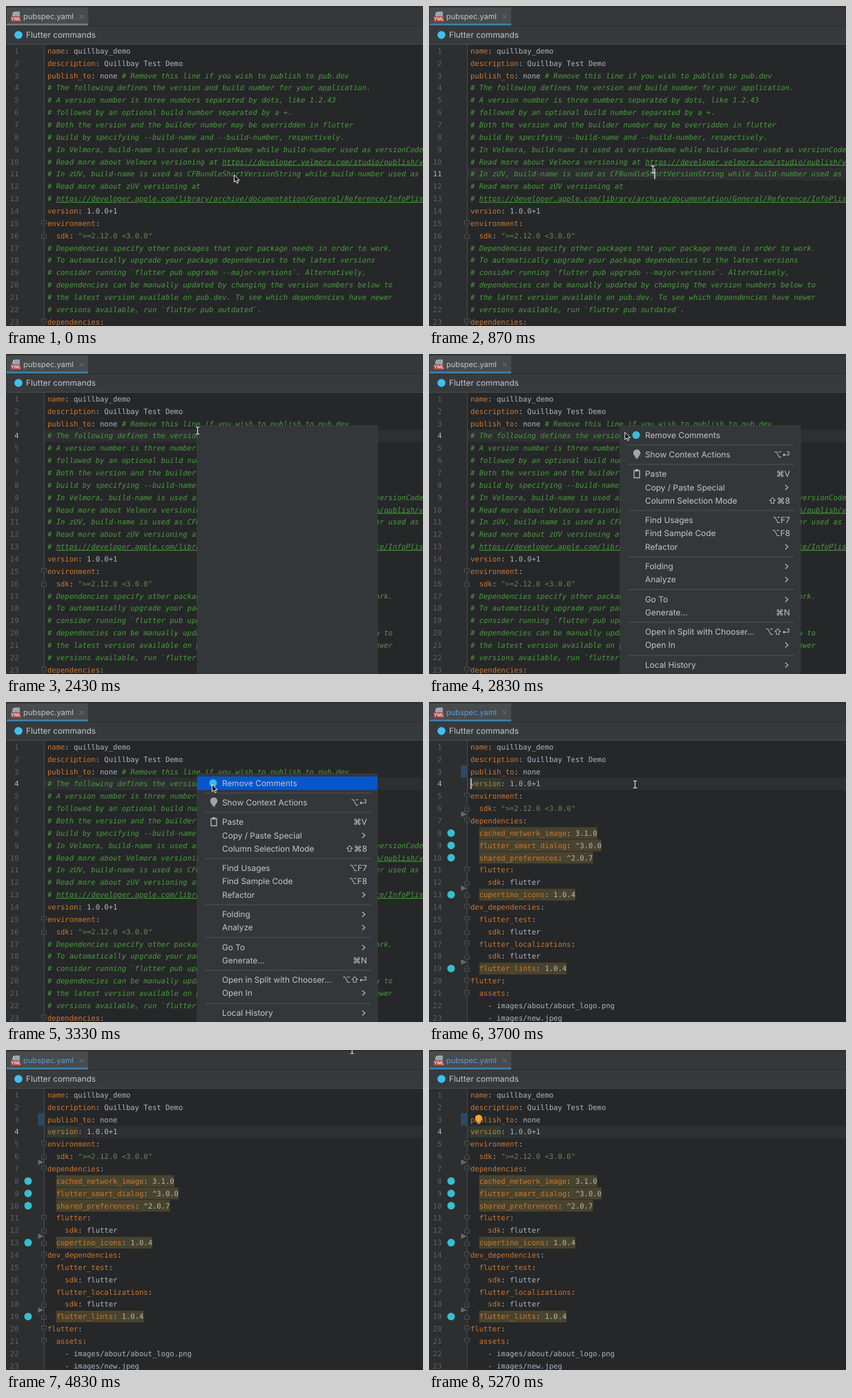
An HTML page that plays this animation: 604 by 464 pixels, repeating every 5.31 s.

```html
<!DOCTYPE html>
<html lang="en">
<head>
<meta charset="utf-8">
<title>Editor: remove comments</title>
<style>
html, body { margin: 0; width: 100%; height: 100%; overflow: hidden; background: #262728; }
svg { display: block; }
text { white-space: pre; text-rendering: geometricPrecision; }
.code { font: 10.523px "DejaVu Sans Mono", "Noto Sans Mono", monospace; fill: #a9b7c6; }
.ui { font: 11.85px Inter, "DejaVu Sans", sans-serif; fill: #c3c6c8; }
.key { fill: #cc7832; }
.str { fill: #6a8759; }
.note { fill: #499c40; font-style: italic; }
.link { text-decoration: underline; }
.num { text-anchor: end; fill: #606366; }
.num.on { fill: #b4b6b8; }
.end { text-anchor: end; }
</style>
</head>
<body>
<svg id="stage" width="604" height="464" viewBox="0 0 604 464"></svg>
<script>
const LOOP = 5310, CHAR = 6.335, PITCH = 17.86, LEFT = 60;
const FOCUS = 600, MENU = 2270, ITEMS = 2560, HOVER = 2850, PICK = 3450, EDIT = 3650, BULB = 5000;

const before = `name: quillbay_demo
description: Quillbay Test Demo
publish_to: none # Remove this line if you wish to publish to pub.dev
# The following defines the version and build number for your application.
# A version number is three numbers separated by dots, like 1.2.43
# followed by an optional build number separated by a +.
# Both the version and the builder number may be overridden in flutter
# build by specifying --build-name and --build-number, respectively.
# In Velmora, build-name is used as versionName while build-number used as versionCode.
# Read more about Velmora versioning at https://developer.velmora.com/studio/publish/versioning
# In zUV, build-name is used as CFBundleShortVersionString while build-number used as
# Read more about zUV versioning at
# https://developer.apple.com/library/archive/documentation/General/Reference/InfoPlistKeyReference
version: 1.0.0+1
environment:
  sdk: ">=2.12.0 <3.0.0"
# Dependencies specify other packages that your package needs in order to work.
# To automatically upgrade your package dependencies to the latest versions
# consider running \`flutter pub upgrade --major-versions\`. Alternatively,
# dependencies can be manually updated by changing the version numbers below to
# the latest version available on pub.dev. To see which dependencies have newer
# versions available, run \`flutter pub outdated\`.
dependencies:`.split("\n");

const after = `name: quillbay_demo
description: Quillbay Test Demo
publish_to: none
version: 1.0.0+1
environment:
  sdk: ">=2.12.0 <3.0.0"
dependencies:
  cached_network_image: 3.1.0
  flutter_smart_dialog: ^3.0.0
  shared_preferences: ^2.0.7
  flutter:
    sdk: flutter
  cupertino_icons: 1.0.4
dev_dependencies:
  flutter_test:
    sdk: flutter
  flutter_localizations:
    sdk: flutter
  flutter_lints: 1.0.4
flutter:
  assets:
    - images/about/about_logo.png
    - images/new.jpeg`.split("\n");

// Menu rows: centre y, label, shortcut (">" opens a submenu)
const items = [
  [117.5, "Remove Comments", ""], [146, "Show Context Actions", "⌥⏎"],
  [174, "Paste", "⌘V"], [193.5, "Copy / Paste Special", ">"], [212.5, "Column Selection Mode", "⇧⌘8"],
  [241, "Find Usages", "⌥F7"], [260, "Find Sample Code", "⌥F8"], [279.5, "Refactor", ">"],
  [308, "Folding", ">"], [327, "Analyze", ">"], [356, "Go To", ">"], [375, "Generate...", "⌘N"],
  [403, "Open in Split with Chooser...", "⌥⇧⏎"], [422, "Open In", ">"], [451, "Local History", ">"]
];

const rowY = n => 65 + (n - 1) * PITCH;
const rect = (x, y, w, h, fill, more = "") => `<rect x="${x}" y="${y}" width="${w}" height="${h}" fill="${fill}" ${more}/>`;
const dot = (x, y, r, fill) => `<circle cx="${x}" cy="${y}" r="${r}" fill="${fill}"/>`;
const path = (d, stroke, fill = "none", more = "") => `<path d="${d}" stroke="${stroke}" fill="${fill}" ${more}/>`;
const text = (x, y, cls, body, more = "") => `<text x="${x}" y="${y}" class="${cls}" ${more}>${body}</text>`;
const span = (cls, s) => s && `<tspan class="${cls}">${s}</tspan>`;
const group = (id, body) => `<g id="${id}">${body}</g>`;
const escape = s => s.replace(/&/g, "&amp;").replace(/</g, "&lt;");

function paint(line) {
  const [, code, note] = escape(line).match(/^([^#]*)(.*)$/);
  return code.replace(/^(\s*)(\w+)(:)(.*)$/, (m, pad, key, colon, value) =>
    pad + span("key", key) + colon + (value.includes('"') ? span("str", value) : value)) +
    span("note", note.replace(/https:.*/, url => span("link", url)));
}
const page = lines => lines.map((s, i) => text(LEFT, rowY(i + 1) + 3.8, "code", paint(s))).join("");

function fold(n, closing) {
  const y = rowY(n), k = closing ? -1 : 1;
  return path(`M51.5 ${y - 4 * k}h7v${5 * k}l-3.5 ${3 * k}l-3.5 ${-3 * k}z M53.5 ${y}h3`, "#5a5d5f", "#292b2c", 'stroke-width=".8"');
}
const folds = (open, close) => open.map(n => fold(n)).join("") + close.map(n => fold(n, true)).join("");

function packageMark(n) {
  const s = after[n - 1].trim();
  return rect(LEFT + 2 * CHAR, rowY(n) - 8.5, s.length * CHAR, 17, "#49432d") + dot(32, rowY(n), 5.5, "#35bfd0");
}
const bulb = (x, y, fill) => dot(x, y - 1.5, 5.2, fill) + rect(x - 2.5, y + 2, 5, 3, fill) + rect(x - 2, y + 5.6, 4, 1.2, "#a5a7a8");

function menuItems() {
  const lines = [132, 160, 227, 294, 341.5, 389, 437].map(y => rect(288, y - .5, 241, 1, "#505456")).join("");
  const rows = items.map(([y, label, keys]) => text(313, y + 4.2, "ui", label) +
    (keys == ">" ? path(`M516 ${y - 3.5}l4 3.5l-4 3.5`, "#b5b8ba", "none", 'stroke-width="1.2"')
                 : text(523, y + 4.2, "ui end", keys))).join("");
  return rect(277, 108, 261, 19.5, "#0756c9", 'id="hover"') + lines + rows +
    dot(300, 117.5, 5.5, "#3dbbd8") + bulb(301, 145, "#a2a5a7") +
    path("M297 169h8v10.5h-8z", "#afb2b4", "none", 'stroke-width="1.4"') + rect(299, 167, 4, 3.5, "#afb2b4");
}

const stage = document.getElementById("stage");
stage.innerHTML =
  rect(0, 0, 604, 464, "#262728") + rect(0, 56, 55, 408, "#2c2e2f") +
  rect(56, 0, 548, 18, "#2d2f30", 'id="row"') + rect(55, 56, 1, 408, "#484a4b") +
  group("old", folds([15, 23], [16]) + page(before)) +
  group("new",
    rect(46, rowY(3) - 9, 9, 18, "#2d4961") + rect(LEFT, rowY(4) - 8, 7 * CHAR, 16, "#303c31") +
    [8, 9, 10, 13, 19].map(packageMark).join("") +
    folds([5, 7, 11, 14, 15, 17, 20, 21], [6, 12, 13, 16, 18, 19]) +
    [6, 12, 18].map(n => path(`M46.5 ${rowY(n) + 4.5}l8 4l-8 4z`, "none", "#686b6d")).join("") + page(after)) +
  before.map((_, i) => text(18.5, rowY(i + 1) + 3.8, "code num", i + 1)).join("") +
  rect(0, 0, 604, 28, "#35383a") + rect(0, 0, 604, 2, "#2e3132") +
  rect(1, 2, 118, 26, "#474b4d") + rect(1, 25.5, 118, 2.8, "#747a7e", 'id="underline"') +
  rect(0, 28.3, 604, 27, "#373a3c") + rect(0, 55, 604, 1, "#4a4d4f") + rect(119, 28, 485, 1, "#2b2d2e") +
  path("M13 8h7v7H9v-3z", "none", "#9aa5ad") + path("M12 8v3H9z", "none", "#c0c7cc") +
  rect(7, 15, 14.5, 8, "#a64545") +
  text(14.2, 21.4, "ui", "YML", 'style="font-size:6.5px;font-weight:700;fill:#f0dede;text-anchor:middle"') +
  text(25, 19.2, "ui", "pubspec.yaml", 'id="tab" style="font-size:11px"') +
  path("M106.5 12.5l6 6m0-6l-6 6", "#777c7f") +
  dot(18, 42, 5.8, "#42bff0") + text(29, 46.2, "ui", "Flutter commands") +
  rect(0, 0, 1.7, 15.5, "#c4c6c8", 'id="caret"') +
  group("lamp", bulb(72, 100.5, "#f2a630")) +
  group("menu", rect(277, 104, 261, 365, "#333739", 'stroke="#45494b" stroke-width=".6"') + group("items", menuItems())) +
  group("arrow", path("M0 0v10.5l2.5-2.2l1.7 3.7l1.8-.8l-1.7-3.5h3.4z", "#f2f2f2", "#080808", 'stroke-width="1"')) +
  group("beam", path("M-2.7 -5.2q2.7 0 2.7 1.5q0-1.5 2.7-1.5M0 -4v8M-2.7 5.2q2.7 0 2.7-1.5q0 1.5 2.7 1.5", "#e4e4e4", "none", 'stroke-width="1.1"'));

const part = id => document.getElementById(id);
const show = (id, on) => part(id).style.display = on ? "" : "none";
const place = (id, x, y) => part(id).setAttribute("transform", `translate(${x} ${y})`);
const numbers = [...document.querySelectorAll(".num")];

// Pointer: time, x, y
const track = [[0, 330.5, 245], [350, 330.5, 245], [600, 327, 244], [730, 327, 244], [1750, 277.5, 111],
  [2650, 277.5, 111], [3150, 298.5, 119.5], [4450, 298.5, 119.5], [4900, 515, -8], [LOOP, 515, -8]];

function pointer(t) {
  const i = track.findIndex(p => p[0] > t), [t0, x0, y0] = track[i - 1], [t1, x1, y1] = track[i];
  const u = (t - t0) / (t1 - t0), s = u * u * (3 - 2 * u);
  return [x0 + (x1 - x0) * s, y0 + (y1 - y0) * s];
}

function draw(t) {
  const edited = t >= EDIT, line = t < FOCUS ? 0 : t < MENU ? 11 : 4;
  show("old", !edited);
  show("new", edited);
  show("row", line);
  place("row", 0, rowY(line) - 9);
  numbers.forEach((n, i) => n.classList.toggle("on", i + 1 == line));
  part("underline").setAttribute("fill", line ? "#3d83ad" : "#747a7e");
  part("tab").style.fill = edited ? "#6299d3" : "#c3c6c8";

  const blink = edited ? (t - 3300) % 1000 < 500 : (t - FOCUS) % 1000 < 500;
  show("caret", blink && line && (t < MENU || edited));
  place("caret", edited ? LEFT : LEFT + 42 * CHAR, rowY(line) - 8);
  show("lamp", t >= BULB);

  show("menu", t >= MENU && t < PICK);
  show("items", t >= ITEMS);
  show("hover", t >= HOVER);

  const isArrow = t < FOCUS || t >= ITEMS && t < PICK, [x, y] = pointer(t);
  show("arrow", isArrow);
  show("beam", !isArrow);
  place("arrow", x, y);
  place("beam", x, y);
}

const start = performance.now();
function tick() {
  draw((performance.now() - start) % LOOP);
  requestAnimationFrame(tick);
}
tick();
</script>
</body>
</html>
```
